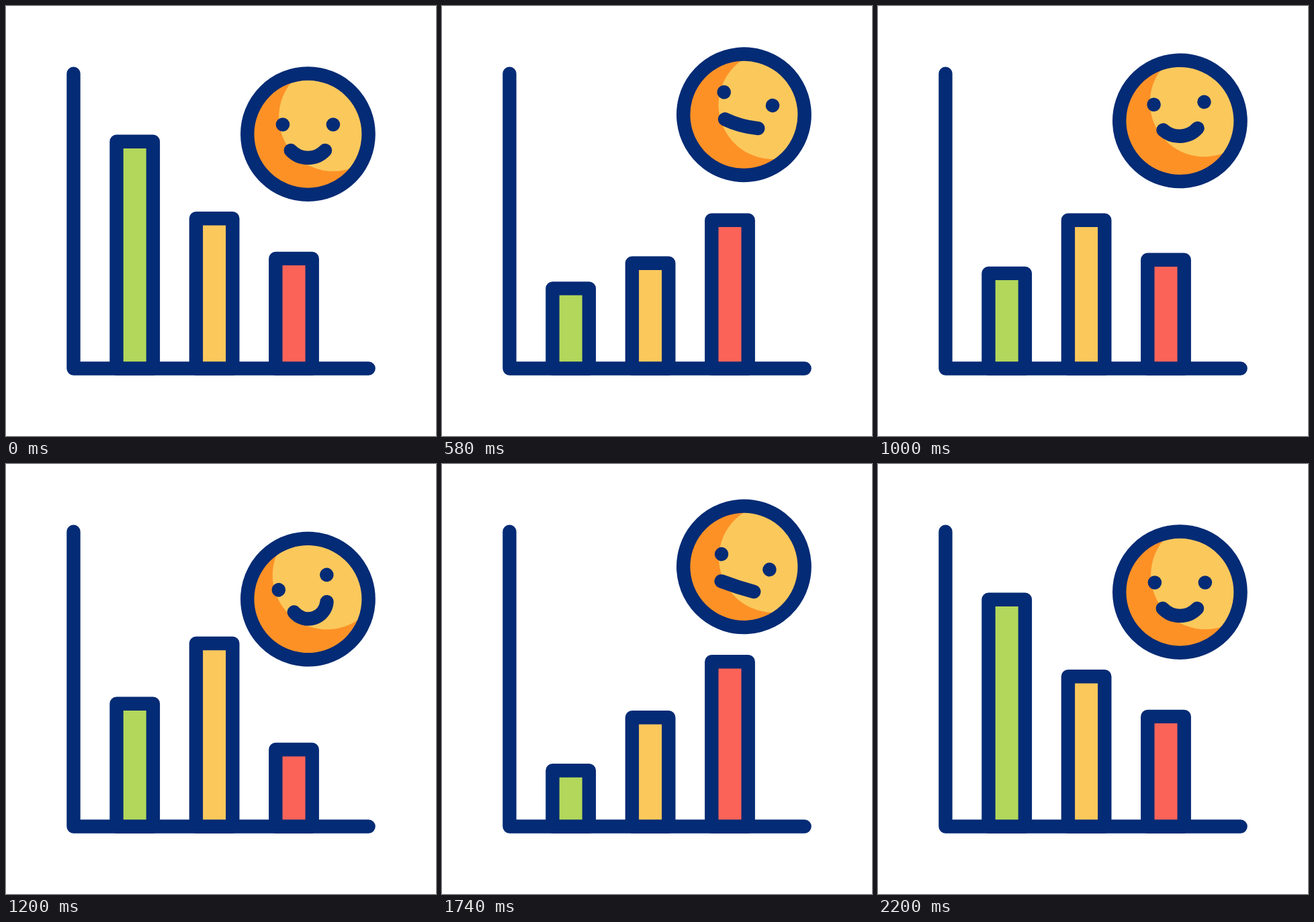
Write an HTML page that moves like this. It is 640x640 px and loops after 2.4 s.

```html
<!DOCTYPE html>
<html lang="en">
<head>
<meta charset="utf-8">
<title>Bar chart with smiling face</title>
<style>
  html, body { margin: 0; width: 100%; height: 100%; overflow: hidden; background: #fff; }
  svg { display: block; width: 100%; height: 100%; }
  .line { stroke: #042b75; stroke-width: 20.4; stroke-linecap: round; stroke-linejoin: round; }
</style>
</head>
<body>
<svg viewBox="0 0 640 640">
  <clipPath id="disc"><circle r="85"/></clipPath>
  <g class="line">
    <path fill="none" d="M100.5 100.7V539.5H539.6"/>
    <rect class="bar" x="164.5" width="54.4" fill="#b2d75b"/>
    <rect class="bar" x="282.9" width="54.4" fill="#fbc85c"/>
    <rect class="bar" x="401.3" width="54.4" fill="#fb6358"/>
  </g>
  <g id="face">
    <circle r="88" fill="#fd9126"/>
    <circle cx="37.5" cy="-25.5" r="80.8" fill="#fbc85c" clip-path="url(#disc)"/>
    <circle class="line" r="90.2" fill="none"/>
    <g id="features" fill="#042b75">
      <circle cx="-37.5" cy="-14.2" r="10.3"/>
      <circle cx="37.5" cy="-14.2" r="10.3"/>
      <path id="mouth" class="line" fill="none"/>
    </g>
  </g>
</svg>
<script>
  const LOOP = 2400, STEP = 20, BASE = 539.5;
  const beats = [200, 700, 1240, 1720, 2200];
  const bounceBeats = [200, 780, 1350, 1786, 2200];

  const barTops = [
    [201.8, 457.5, 355.2, 457.5, 201.8],
    [316.2, 394, 265, 377.6, 316.2],
    [375.9, 309, 426.9, 293.9, 375.9]
  ];
  const faceY = [190.7, 150.8, 211.5, 151, 190.7];
  const tilt = [0, 18, -18, 18, 0];
  const lift = [0, -12, -12, 6.6, 0];
  const smile = [11, 0.8, 17.5, 0.6, 11];

  const bars = document.querySelectorAll('.bar');
  const [face, features, mouth] =
    ['face', 'features', 'mouth'].map(id => document.getElementById(id));

  // Eased value between the two keys around t
  function at(t, keys, times = beats) {
    if (t <= times[0]) return keys[0];
    const i = times.findIndex(time => t < time);
    if (i < 0) return keys[keys.length - 1];
    const x = (t - times[i - 1]) / (times[i] - times[i - 1]);
    return keys[i - 1] + (keys[i] - keys[i - 1]) * x * x * (3 - 2 * x);
  }

  // Circular arc with the given sag below its ends
  function arc(half, y, sag) {
    const r = (half * half + sag * sag) / (2 * sag);
    return `M${-half} ${y}A${r} ${r} 0 0 0 ${half} ${y}`;
  }

  function draw(now) {
    const t = Math.floor(now % LOOP / STEP) * STEP;
    bars.forEach((bar, i) => {
      const top = at(t, barTops[i]);
      bar.setAttribute('y', top);
      bar.setAttribute('height', BASE - top);
    });
    face.setAttribute('transform',
      `translate(449.4 ${at(t, faceY, bounceBeats)}) rotate(${at(t, tilt)})`);
    features.setAttribute('transform', `translate(0 ${at(t, lift)})`);
    mouth.setAttribute('d', arc(25.6, 24.3, at(t, smile)));
  }

  const start = performance.now();
  function tick() {
    draw(performance.now() - start);
    requestAnimationFrame(tick);
  }
  tick();
</script>
</body>
</html>
```
